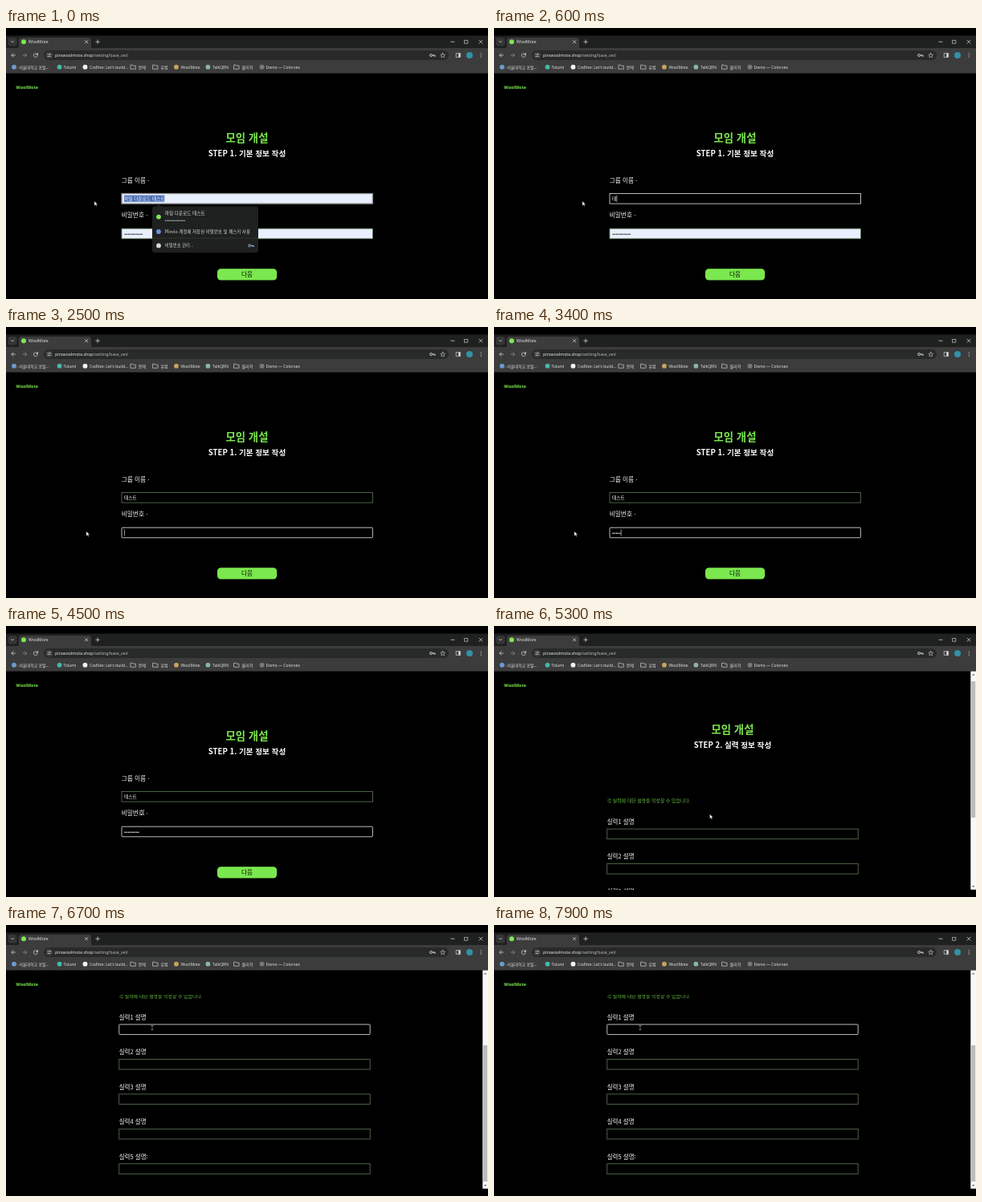
These frames come from a looping animation (600 px wide and 338 px high, 8000 ms). An HTML page:

```html
<!DOCTYPE html>
<html lang="ko">
<head>
<meta charset="utf-8">
<style>
html, body { margin: 0; width: 100%; height: 100%; overflow: hidden; background: #000; }
svg { display: block; width: 100vw; height: 100vh; }
text { font-family: "Noto Sans", "Noto Sans CJK KR", "Noto Sans CJK", sans-serif; white-space: pre; }
.ko { font-family: "Noto Sans CJK KR", "Noto Sans CJK", sans-serif; }
.dots { font-family: "Liberation Sans", sans-serif; }
</style>
</head>
<body>
<svg id="stage" viewBox="0 0 600 338" xmlns="http://www.w3.org/2000/svg"></svg>
<script>
const LOOP = 8000;
const GREEN = '#7be84f', BORDER = '#5f7959', AUTOFILL = '#e8f0fe', ICON = '#d0d2d3';

const rect = (x, y, w, h, fill, more = '') =>
  `<rect x="${x}" y="${y}" width="${w}" height="${h}" fill="${fill}" ${more}/>`;
const circle = (x, y, r, fill, more = '') => `<circle cx="${x}" cy="${y}" r="${r}" fill="${fill}" ${more}/>`;
const line = (d, color = ICON, width = .8) =>
  `<path d="${d}" fill="none" stroke="${color}" stroke-width="${width}" stroke-linecap="round" stroke-linejoin="round"/>`;
const text = (x, y, size, fill, str, more = '') =>
  `<text x="${x}" y="${y}" font-size="${size}" fill="${fill}" ${more}>${str}</text>`;
const ko = (x, y, size, fill, str, more = '') => text(x, y, size, fill, str, 'class="ko" ' + more);
const dots = (x, y, n, fill, id = '') =>
  text(x, y, 6, fill, '•'.repeat(n), `class="dots" ${id && `id="${id}"`}`);
const field = (y, id, x = 144) => rect(x, y, 312.4, 12.6, '#000', `id="${id}" stroke="${BORDER}" stroke-width=".8"`);
const key = (x, y, color) =>
  circle(x - 1.9, y, 1.5, 'none', `stroke="${color}" stroke-width=".9"`) +
  line(`M${x - .3} ${y}H${x + 3.2}V${y + 1.4}M${x + 1.7} ${y}v1.1`, color, .9);
const folder = x => line(`M${x - 3} 46.2h2.2l.8 .9h3v4.1h-6z`, ICON, .7);

function browser() {
  let s = rect(0, 9.5, 600, 16, '#1f2020') + rect(0, 25, 600, 31.5, '#3c3c3c');
  s += rect(2.5, 12, 11, 10.5, '#343535', 'rx="3"') + line('M6.5 16.5l1.5 1.5 1.5-1.5');
  s += `<path d="M13 25.5q3 0 3-3v-7q0-3.5 3.5-3.5h83q3.5 0 3.5 3.5v7q0 3 3 3z" fill="#3c3c3c"/>`;
  s += circle(22, 17.2, 3, GREEN) + text(28, 19.3, 5.1, '#e2e3e3', 'WoolMote');
  s += line('M98.5 15.6l3.2 3.2m0-3.2l-3.2 3.2') + line('M111.8 17.2h4.6m-2.3-2.3v4.6');
  s += line('M554 17.2h4') + line('M571 15.4h3.8v3.8h-3.8z', ICON, .7) + line('M589 15.2l4 4m0-4l-4 4');

  s += line('M11.5 34H7m2-2.2L6.8 34 9 36.2') + line('M21 34h4.5m-2-2.2l2.2 2.2-2.2 2.2', '#8b8d8e');
  s += line('M39.3 33.2a2.5 2.5 0 1 0 0 1.8M39.5 31.4v2h-2');
  s += rect(47, 28, 504, 12, '#282929', 'rx="6"') + circle(53.8, 34, 4.6, '#3c3c3c');
  s += line('M51.8 32.7h1.6m1.9 0h.6M51.8 35.3h.6m1.9 0h1.6', ICON, .7);
  s += circle(54.4, 32.7, .7, ICON) + circle(53.2, 35.3, .7, ICON);
  s += text(61, 36, 5.2, '#e6e7e7', 'pirowoolmote.shop<tspan fill="#b9bbbc">/setting/base_set/</tspan>');
  s += key(531, 34, ICON);
  s += line('M543.7 31.2l.8 1.9 2.1.2-1.6 1.4.5 2.1-1.8-1.1-1.8 1.1.5-2.1-1.6-1.4 2.1-.2z', ICON, .6);
  s += line('M560.6 31.6h5v4.8h-5z', ICON, .7) + rect(563.2, 31.6, 2.4, 4.8, ICON);
  s += circle(577, 34, 4, '#3490a6');
  for (const y of [31.8, 34, 36.2]) s += circle(591.3, y, .6, ICON);

  const mark = (x, color, label, tx) => circle(x, 48.7, 2.9, color) + text(tx, 50.6, 5, '#dedfdf', label);
  s += mark(10, '#6c9bd2', ': 서울대학교 포털...', 13.5) + mark(66.6, '#45b8a8', 'Tolumi', 71.5);
  s += mark(98.5, '#f2f2f2', "CodVex: Let's build...", 104);
  s += mark(212, '#c7a35c', 'WoolMote', 217.5) + mark(251.4, '#8ab5a8', 'TalkQRN', 257);
  s += mark(318.6, '#77797a', 'Demo — Colorvex', 323.6);
  [[158.3, '문제'], [186, '유럽'], [287, '물리학']].forEach(([x, label]) =>
    s += folder(x) + ko(x + 6.4, 50.6, 5.1, '#dedfdf', label));
  return s;
}

function titles(cx, step) {
  const mid = 'text-anchor="middle" font-weight="700"';
  return ko(cx, 141.6, 13.4, GREEN, '모임 개설', mid) + ko(cx, 159.6, 9.6, '#fff', step, mid);
}

function basicForm() {
  const label = 'font-weight="500"';
  return titles(300, 'STEP 1. 기본 정보 작성') +
    ko(143.7, 192.8, 7.7, '#f4f4f4', '그룹 이름 ·', label) +
    ko(143.7, 236.3, 7.7, '#f4f4f4', '비밀번호 ·', label) +
    field(206.5, 'nameBox') + rect(147, 208.7, 50.3, 8, '#4a6db4', 'id="nameSel"') +
    ko(147, 214.9, 5.75, '#fff', '', 'id="nameText"') +
    field(250.2, 'passBox') + rect(147, 252.4, 0, 8, '#4a6db4', 'id="passSel"') +
    dots(147, 258.6, 0, '#fff', 'passText') +
    rect(263, 300.2, 74.2, 14.3, GREEN, 'rx="4.5"') +
    ko(300, 310.2, 7.6, '#0b1a06', '다음', 'text-anchor="middle" font-weight="500"');
}

function popup() {
  return `<g id="popup"><path d="M187 223l3.5-3 3.5 3z" fill="#1f2020"/>` +
    rect(182, 222.6, 132, 57.6, '#1f2020', 'rx="3"') +
    circle(190, 235.6, 2.9, GREEN) + ko(197.8, 233.2, 5.65, '#e3e4e4', '파일 다운로드 테스트') +
    dots(197.8, 242, 12, '#c4c6c7') +
    circle(190, 254, 2.9, '#6f8fd8') +
    ko(197.8, 256, 5.5, '#d5d7d8', 'Mirelo 계정에 저장된 비밀번호 및 패스키 사용') +
    rect(182, 261.8, 132, .6, '#3f4142') +
    circle(190, 271.4, 2.9, '#d5d7d8') + ko(197.8, 273.4, 5.4, '#d5d7d8', '비밀번호 관리...') +
    key(305, 271.4, '#a0bdf0') + '</g>';
}

function skillForm() {
  let s = titles(297, 'STEP 2. 실력 정보 작성') ;
  s = `<g transform="translate(0 -137)">${s}</g>`;
  s += ko(140.7, 91, 5.9, '#67bd45', '각 실력에 대한 설명을 작성할 수 있습니다.');
  for (let i = 0; i < 5; i++) {
    const y = i * 43.45;
    s += ko(140.7, 117.9 + y, 7.5, '#f4f4f4', `실력${i + 1} 설명${i === 4 ? ':' : ''}`, 'font-weight="500"');
    s += field(124 + y, 'skill' + i, 140.8);
  }
  return s;
}

const stage = document.getElementById('stage');
stage.innerHTML = `<defs><clipPath id="view">${rect(0, 87, 600, 242, '#fff')}</clipPath></defs>` +
  rect(0, 0, 600, 338, '#000') + browser() +
  text(12.6, 76.2, 5.4, GREEN, 'WoolMote', 'font-weight="700"') +
  `<g id="basic">${basicForm()}${popup()}</g>` +
  `<g id="skills"><g clip-path="url(#view)"><g id="scroller">${skillForm()}</g></g>` +
  rect(593.3, 56.5, 6.7, 272.3, '#f8f8f8') + rect(594.1, 0, 5.1, 170, '#bdbdbd', 'id="thumb"') +
  `<path d="M595 61.5l1.7-2 1.7 2zM595 324l1.7 2 1.7-2z" fill="#666"/></g>` +
  rect(0, 0, .6, 8, '#fff', 'id="caret"') +
  `<path id="arrow" d="M0 0v5.4l1.3-1.1.9 2 .9-.4-.9-1.9h1.7z" fill="#fff" stroke="#222" stroke-width=".3"/>` +
  `<g id="beam">${line('M-1.2-2.6h2.4M0-2.6v5.2M-1.2 2.6h2.4', '#999', .7)}</g>`;

const el = {};
stage.querySelectorAll('[id]').forEach(node => el[node.id] = node);
const set = (node, attrs) => { for (const k in attrs) node.setAttribute(k, attrs[k]); };
const show = (node, on) => node.setAttribute('visibility', on ? 'visible' : 'hidden');
const write = (node, str) => { if (node.textContent !== str) node.textContent = str; };
const ease = (t, from, to) => {
  const p = Math.min(1, Math.max(0, (t - from) / (to - from)));
  return p * p * (3 - 2 * p);
};

// Pointer legs: start, end, destination.
const START = [110, 216];
const LEGS = [
  [1200, 1700, 176, 260], [1900, 2250, 100, 255], [4050, 4450, 171, 232.5],
  [4600, 4950, 288, 307], [5100, 5400, 262, 210], [5800, 6150, 182, 128]
];
function pointer(t) {
  let [x, y] = START;
  for (const [from, to, tx, ty] of LEGS) {
    const p = ease(t, from, to);
    x += (tx - x) * p;
    y += (ty - y) * p;
  }
  return [x, y];
}

const NAME_KEYS = [[0, '파일 다운로드 테스트'], [500, 'ㅌ'], [600, '테'], [700, '텟'], [800, '테스'], [900, '테슽'], [1000, '테스트']];
const CLEAR = 2400, FIRST_KEY = 2800, KEY_GAP = 145, NEXT = 5050, FOCUS = 6180;
const CARET_ON = 500;

function render(t) {
  const [x, y] = pointer(t);
  const second = t >= NEXT;
  show(el.basic, !second);
  show(el.skills, second);

  const untouched = t < 500;
  show(el.popup, untouched && !second);
  show(el.nameSel, untouched);
  write(el.nameText, NAME_KEYS.filter(k => t >= k[0]).pop()[1]);
  const inPass = t >= 1850;
  set(el.nameBox, untouched ? { fill: AUTOFILL, stroke: '#8c8c8c', 'stroke-width': 1.3 }
    : { fill: '#000', stroke: inPass ? BORDER : '#e6e6e6', 'stroke-width': .8 });

  const filled = t < CLEAR;
  const typed = t < FIRST_KEY ? 0 : Math.min(9, 1 + Math.floor((t - FIRST_KEY) / KEY_GAP));
  write(el.passText, '•'.repeat(filled ? 11 : typed));
  set(el.passText, { fill: filled ? '#222' : '#fff' });
  set(el.passBox, {
    fill: filled ? AUTOFILL : '#000', stroke: inPass ? '#eee' : BORDER, rx: inPass ? 1 : 0
  });
  const selected = filled && inPass ? Math.max(0, Math.min(23, 176 - x - 6)) : 0;
  set(el.passSel, { x: 170 - selected, width: selected });

  const scroll = ease(t, 5250, 5600);
  set(el.scroller, { transform: `translate(0 ${(137 * (1 - scroll)).toFixed(2)})` });
  set(el.thumb, { y: 64 + 86 * scroll });
  set(el.skill0, t >= FOCUS ? { stroke: '#eee', rx: 1 } : { stroke: BORDER, rx: 0 });

  // Caret stays lit after each key, then blinks.
  let caret = null;
  if (t >= FOCUS) caret = [143.8, 126.4, t - FOCUS];
  else if (!second && t >= CLEAR) {
    const lastKey = typed ? FIRST_KEY + (typed - 1) * KEY_GAP : CLEAR;
    caret = [147.3 + typed * 2.1, 252.5, t - lastKey];
  } else if (!untouched && !inPass) caret = [147.3 + el.nameText.textContent.length * 5.3, 208.8, Math.max(0, t - 1000)];
  show(el.caret, caret && Math.floor(caret[2] / CARET_ON) % 2 === 0);
  if (caret) set(el.caret, { x: caret[0], y: caret[1] });

  const over = (x0, y0, x1, y1) => x > x0 && x < x1 && y > y0 && y < y1;
  const beam = second ? over(141, 123, 453, 137)
    : over(144, 250, 456, 263) || over(144, 206, 456, 219) || over(144, 228, 180, 238);
  show(el.beam, beam);
  show(el.arrow, !beam);
  set(beam ? el.beam : el.arrow, { transform: `translate(${x.toFixed(2)} ${y.toFixed(2)})` });
}

const began = performance.now();
function tick() {
  render((performance.now() - began) % LOOP);
  requestAnimationFrame(tick);
}
tick();
</script>
</body>
</html>
```
